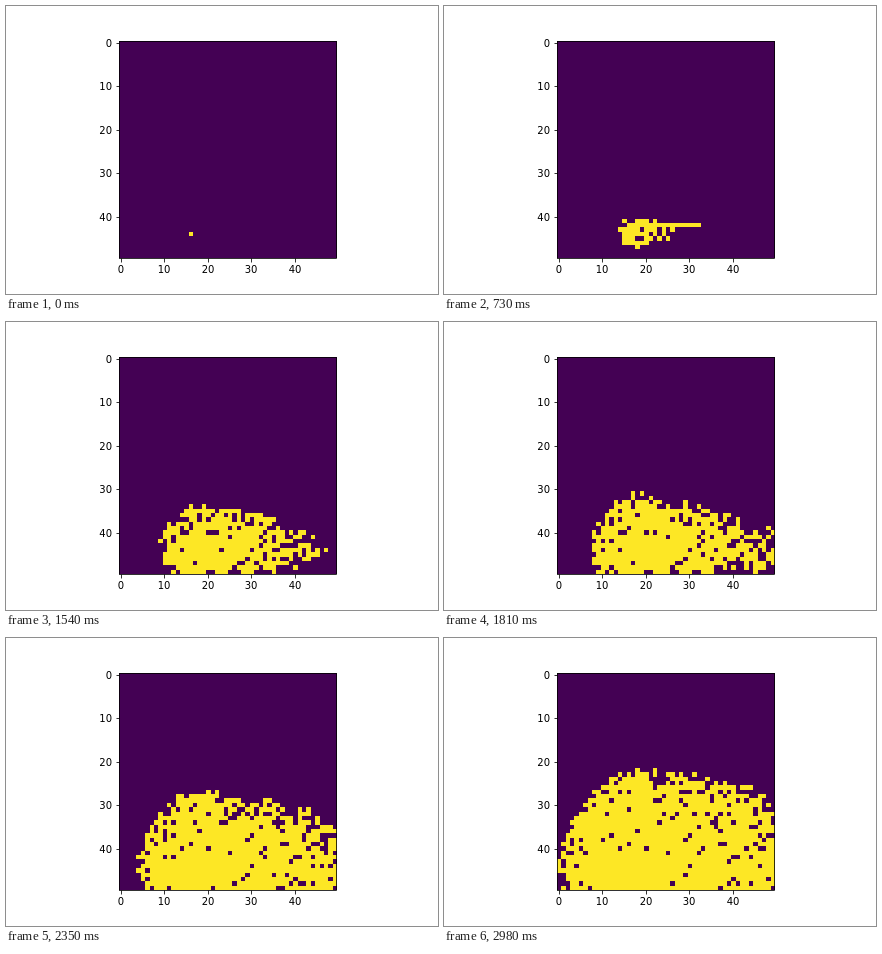
Recreate the animation shown at these times as an HTML page with a canvas. Size 432 by 288 pixels, loop 3010 ms.

```html
<!DOCTYPE html>
<html>
<head>
<meta charset="utf-8">
<style>
  html, body { margin: 0; width: 432px; height: 288px; overflow: hidden; background: #fff; }
  canvas { display: block; }
</style>
</head>
<body>
<canvas width="432" height="288"></canvas>
<script>
const ctx = document.querySelector('canvas').getContext('2d');
const SIZE = 50, LOOP = 3010, FIRST = 250, STEP = 30;
const seed = { col: 16, row: 44 };
const speed = { left: 0.18, right: 0.75, up: 0.25, down: 0.21 }; // cells per step

const random = (col, row) => {
  const n = Math.sin(col * 127.1 + row * 311.7) * 43758.5453;
  return n - Math.floor(n);
};

// Steps until a cell fills: a pointed, wind-blown oval front plus a long-tailed random delay.
function stepsUntilFilled(col, row) {
  const dx = col - seed.col, dy = row - seed.row;
  if (dy === -2 && dx >= 0 && dx <= 16) return dx + 1; // the first branch runs straight ahead
  const x = dx < 0 ? -dx / speed.left : dx / speed.right;
  const y = dy < 0 ? -dy / speed.up : dy / speed.down;
  const front = (x ** 1.5 + y ** 1.5) ** (1 / 1.5);
  const delay = (5 + col / 4) * ((1 - random(col, row)) ** (-1 / 1.5) - 1);
  return front + delay;
}

const arrival = Array.from({ length: SIZE }, (_, row) =>
  Array.from({ length: SIZE }, (_, col) => FIRST + STEP * (stepsUntilFilled(col, row) - 1)));
arrival[seed.row][seed.col] = 0;
arrival[seed.row - 1][seed.col] = 90;

const edgeX = col => Math.round(113 + 4.36 * col);
const edgeY = row => Math.round(34 + 4.36 * row);

function line(x1, y1, x2, y2) {
  ctx.beginPath();
  ctx.moveTo(x1, y1);
  ctx.lineTo(x2, y2);
  ctx.stroke();
}

function drawAxes() {
  ctx.strokeStyle = ctx.fillStyle = '#000';
  ctx.lineWidth = 0.8;
  ctx.font = '10px "DejaVu Sans", sans-serif';
  ctx.strokeRect(113.5, 35.5, 217, 217);
  for (let n = 0; n < SIZE; n += 10) {
    const offset = (n + 0.5) * 4.3488;
    const x = Math.round(112.68 + offset);
    const y = Math.round(34.56 + offset);
    line(x + 0.5, 252.5, x + 0.5, 256.5);
    line(110.5, y + 0.5, 113.5, y + 0.5);
    ctx.textAlign = 'center';
    ctx.fillText(n, x, 267);
    ctx.textAlign = 'right';
    ctx.fillText(n, 106, y + 4);
  }
}

function draw(now) {
  let t = now % LOOP;
  if (t >= FIRST) t = FIRST + Math.floor((t - FIRST) / STEP) * STEP;
  ctx.fillStyle = '#fff';
  ctx.fillRect(0, 0, 432, 288);
  ctx.fillStyle = '#440154';
  ctx.fillRect(113, 35, 218, 217);
  ctx.fillStyle = '#fde725';
  arrival.forEach((cells, row) => cells.forEach((time, col) => {
    if (time > t) return;
    const x = edgeX(col), y = edgeY(row);
    ctx.fillRect(x, y, edgeX(col + 1) - x, edgeY(row + 1) - y);
  }));
  drawAxes();
}

const start = performance.now();
function tick() {
  draw(performance.now() - start);
  requestAnimationFrame(tick);
}
tick();
</script>
</body>
</html>
```
